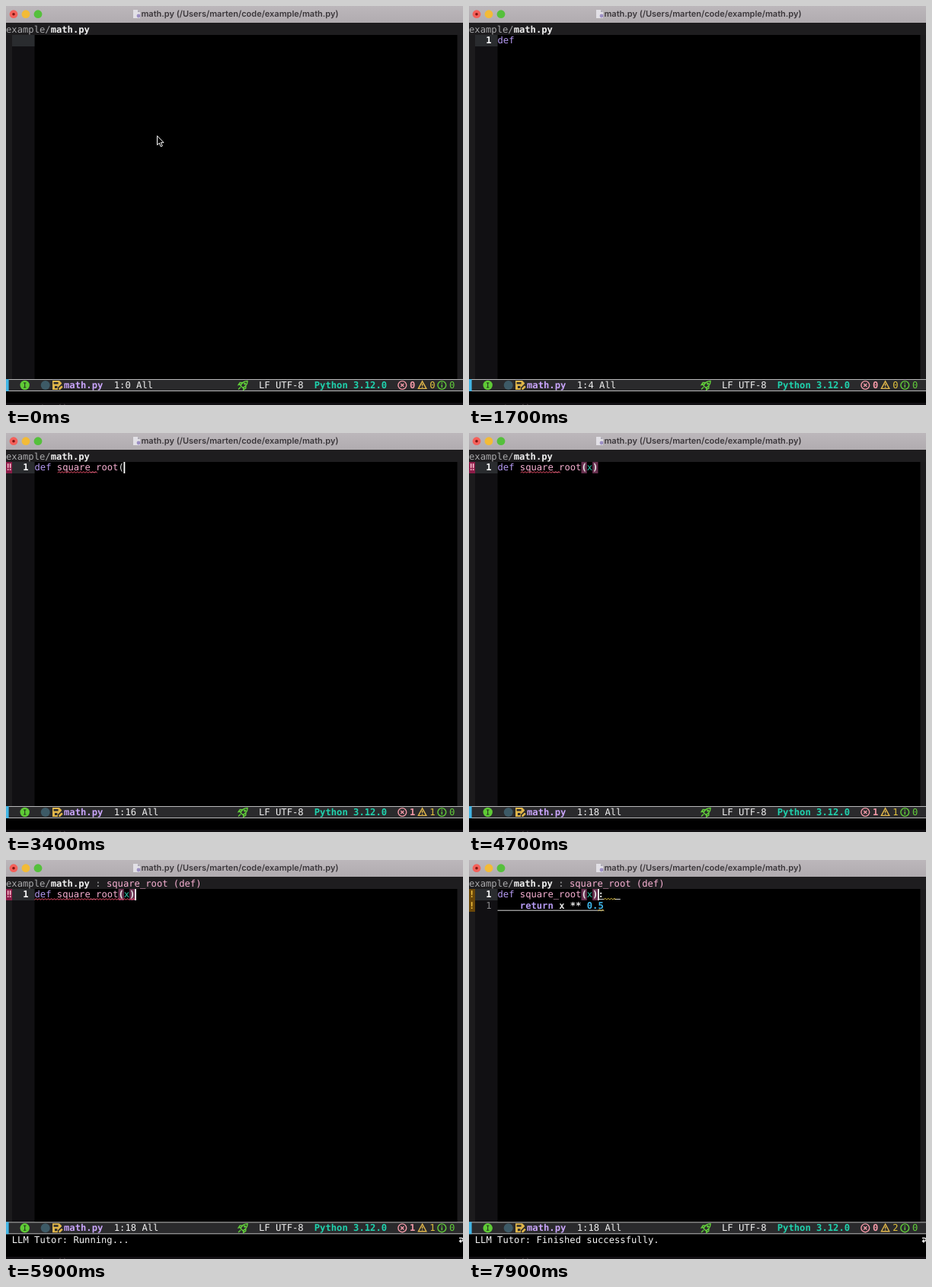
Animation, 600 px wide and 524 px high, one loop 8 s. Source, as an HTML page:

```html
<!DOCTYPE html>
<html lang="en">
<head>
<meta charset="utf-8">
<title>math.py</title>
<style>
  html, body { margin: 0; width: 100%; height: 100%; overflow: hidden; background: #000; }
  svg { display: block; width: 600px; height: 524px; }
  text { font: 12.18px "DejaVu Sans Mono", monospace; white-space: pre; text-rendering: geometricPrecision; }
  .b { font-weight: 700; }
  .title { font: 600 11px Inter, sans-serif; }
</style>
</head>
<body>
<svg viewBox="0 0 600 524">
  <defs>
    <linearGradient id="bar" x2="0" y2="1">
      <stop stop-color="#bcb7bb"/><stop offset="1" stop-color="#b1acb0"/>
    </linearGradient>
  </defs>
  <rect width="600" height="524"/>
  <rect y="22" width="600" height="16" fill="#1e1d1f"/>
  <rect y="38" width="8" height="452" fill="#1c1b1d"/>
  <rect x="8" y="38" width="29.5" height="452" fill="#111013"/>
  <rect x="592.5" y="38" width="7.5" height="452" fill="#1c1b1d"/>

  <rect width="600" height="22" fill="url(#bar)"/>
  <circle cx="10" cy="10.7" r="5.4" fill="#f4605a"/>
  <circle cx="10" cy="10.7" r="1.8" fill="#7d1512"/>
  <circle cx="26" cy="10.7" r="5.4" fill="#f3bb37"/>
  <circle cx="42" cy="10.7" r="5.4" fill="#55c03c"/>
  <path d="M167 5h6l3 3v8h-9z" fill="#e2e0e6"/>
  <path d="M173 5v3h3z" fill="#aaa7b2"/>
  <circle cx="174" cy="13" r="2.4" fill="#9c8fc4"/>
  <text class="title" x="307" y="14.4" text-anchor="middle" fill="#3a363a">math.py (/Users/marten/code/example/math.py)</text>

  <g id="editor"></g>

  <g id="mode">
    <rect y="490" width="600" height="34"/>
    <rect y="490" width="600" height="16" fill="#b9b9ba"/>
    <rect y="491" width="600" height="14" fill="#2a2a2c"/>
    <rect y="490" width="3.6" height="16" fill="#42b6e6"/>
    <circle cx="24.7" cy="498" r="6.2" fill="#5fcb36"/>
    <path d="M23 495h3.4M23 501h3.4M24.7 495v6" stroke="#23351c" stroke-width="1.1"/>
    <circle cx="51.7" cy="498" r="6" fill="#3d5a66"/>
    <path d="M61 492h9l3 3v1l-5 5v3h-7z" fill="#e0b64a"/>
    <path d="M62.6 494h6v2.5h-6zM64 499h3.4v3H64z" fill="#2a2a2c"/>
    <path d="M69.3 504v-2l3.6-3.6 1.8 1.8-3.6 3.8z" fill="#e0b64a"/>
    <g fill="none" stroke="#62cf3a" stroke-width="1.4">
      <path d="M308 498.5q3-6 9-6 0 6-6 9zM308.2 497l-3 .6 2-3 3 .2M312.2 501l-.5 3 3-2 .2-3M305 503.6l3-3"/>
      <circle cx="313.6" cy="496" r=".8"/>
    </g>
    <g fill="none" stroke-width="1.4">
      <circle cx="520.3" cy="498" r="5.4" stroke="#f59aa8"/>
      <path d="M518.2 495.9l4.2 4.2m0-4.2l-4.2 4.2" stroke="#f59aa8"/>
      <path d="M546.6 492.8l5.2 9.6h-10.4zM546.6 496v3m0 1v1.3" stroke="#e0b64a"/>
      <circle cx="572.3" cy="498" r="5.4" stroke="#62cf3a"/>
      <path d="M572.3 494.6v1.4m0 1v4" stroke="#62cf3a"/>
    </g>
    <g id="status"></g>
  </g>

  <g id="echo"></g>
  <rect y="521" width="600" height="3" fill="#121013"/>
  <text x="8" y="531.5" fill="#5c5358"> _ setup()</text>
  <path id="mouse" d="M198.5 170.5v12l2.8-2.5 2 4.7 2-.9-2-4.5h3.7z" fill="#000" stroke="#fff"/>
</svg>

<script>
const LOOP = 8000, W = 7.33, X0 = 37.5;
const SOURCE = 'def square_root(x)';
// When each character of SOURCE is typed.
const KEYS = [700, 800, 1000, 1200, 1900, 2100, 2300, 2500, 2600, 2700,
              2900, 3000, 3100, 3200, 3300, 3400, 3700, 4100];
const RUN = 4900, DONE = 6500, CHECKED = 6800;
const C = { key: '#b79cf5', fn: '#f7b0d2', fg: '#e8e8e8', arg: '#2fc9ae',
            err: '#f2506c', warn: '#e3c33d', pair: '#67304f', num: '#3fb7ea' };

const $ = id => document.getElementById(id);
const rect = (x, y, w, h, fill) =>
  `<rect x="${x}" y="${y}" width="${w}" height="${h}" fill="${fill}"/>`;
const text = (x, y, s, fill, bold) =>
  `<text x="${x}" y="${y}" fill="${fill}"${bold ? ' class="b"' : ''}>${s}</text>`;
const at = col => X0 + col * W;

function wave(x1, x2, y, color) {
  let d = `M${x1} ${y}`;
  for (let x = x1, up = true; x < x2; x += 2, up = !up) d += `l2 ${up ? -1.6 : 1.6}`;
  return `<path d="${d}" fill="none" stroke="${color}"/>`;
}

// Solid while keys are pressed, then half a second off and on.
function cursorOn(t) {
  const last = [-500, ...KEYS, RUN].filter(k => k <= t).pop();
  return Math.floor((t - last) / 500) % 2 === 0;
}

function diagnostics(t) {
  if (t < 2200) return [0, 0];
  if (t < 3100) return [1, 2];
  return t < CHECKED ? [1, 1] : [0, 2];
}

function gutter(y, error) {
  return rect(0, y, 8, 15, error ? '#8c1c48' : '#6a4708') + (error
    ? text(-1, y + 11, '!', '#ffc4d4', true) + text(2, y + 11, '!', '#ffc4d4', true)
    : text(0, y + 11, '!', '#f0c040', true));
}

function code(n, t) {
  const typed = SOURCE.slice(0, n);
  let s = '';
  if (n === 18) s += rect(at(15), 38, W, 15, C.pair) + rect(at(17), 38, W, 15, C.pair);
  s += text(at(0), 49.4, typed.slice(0, 3), n < 3 ? C.fg : C.key);
  s += text(at(4), 49.4, typed.slice(4, 15), C.fn);
  s += text(at(15), 49.4, typed.slice(15, 16), C.fg, n === 18);
  s += text(at(16), 49.4, typed.slice(16, 17), C.arg);
  s += text(at(17), 49.4, typed.slice(17), C.fg, n === 18);
  if (t >= 2200 && t < 3100) s += wave(at(3), at(6), 52.3, C.warn) + wave(at(5), at(6) - 3, 52.3, C.err);
  else if (t >= 3100 && t < 5400) s += wave(at(4) + 1, at(11), 52.3, C.err);
  else if (t >= 5400 && t < CHECKED) s += wave(at(0), at(18), 52.3, C.err);
  return s;
}

function completion(t) {
  let s = text(at(18), 49.4, ':', C.fg, true);
  s += rect(at(18), 51, 4 * W, 1, '#d8d8d8');
  s += text(at(4), 64.1, 'return', C.key, true);
  s += text(at(11), 64.1, 'x **', C.fg, true) + text(at(16), 64.1, '0.5', C.num, true);
  s += rect(at(0), 65.7, 19 * W, 1, '#d8d8d8') + text(22.3, 64.1, '1', '#8a8a8c');
  if (t >= CHECKED) {
    s += rect(at(19), 50.4, 14, 2, '#000') + wave(at(19), at(21), 52, C.warn);
    s += wave(at(18), at(19), 66.8, C.warn) + gutter(53, false);
  }
  return s;
}

function editor(n, t) {
  let s = text(0, 34.6, 'example/', '#aaaaac') + text(8 * W, 34.6, 'math.py', '#f0f0f0', true);
  if (t >= 5300) s += text(16 * W, 34.6, ':', '#aaaaac') + text(18 * W, 34.6, 'square_root (def)', C.fn);
  s += rect(8, 38, 29.5, 15, '#2a2c2f');
  if (n) s += text(22.3, 49.4, '1', '#fff', true);
  if (t >= 2200) s += gutter(38, t < CHECKED);
  s += code(n, t);
  if (t >= DONE) s += completion(t);
  if (cursorOn(t)) s += rect(at(n) - .3, 38, 1.8, 15, '#fff');
  return s;
}

function status(n, t) {
  const [errors, warnings] = diagnostics(t), y = 502.2;
  return text(76, y, 'math.py', '#c9a5fb', true) + text(141.8, y, `1:${n} All`, '#f0f0f0')
    + text(332, y, 'LF UTF-8', '#f0f0f0') + text(404.8, y, 'Python 3.12.0', '#1fd3ae', true)
    + text(530, y, errors, '#f59aa8', true) + text(556.2, y, warnings, C.warn)
    + text(582, y, 0, '#62cf3a');
}

function echo(t) {
  if (t < RUN) return '';
  return text(7.8, 503.2, 'LLM Tutor: ' + (t < DONE ? 'Running...' : 'Finished successfully.'), '#f4f4f4')
    + '<path d="M595 496.5h3q2 0 2 2t-2 2h-2M597.5 498.5l-2 2 2 2" fill="none" stroke="#eee" stroke-width="1.3"/>';
}

let shown = -1;
function draw() {
  const t = Math.floor(performance.now() % LOOP / 100) * 100;
  if (t !== shown) {
    shown = t;
    const n = KEYS.filter(k => k <= t).length;
    $('editor').innerHTML = editor(n, t);
    $('status').innerHTML = status(n, t);
    $('echo').innerHTML = echo(t);
    $('mode').setAttribute('transform', `translate(0 ${t < RUN ? 0 : -14.7})`);
    $('mouse').style.display = t < KEYS[0] ? '' : 'none';
  }
  requestAnimationFrame(draw);
}
draw();
</script>
</body>
</html>
```
